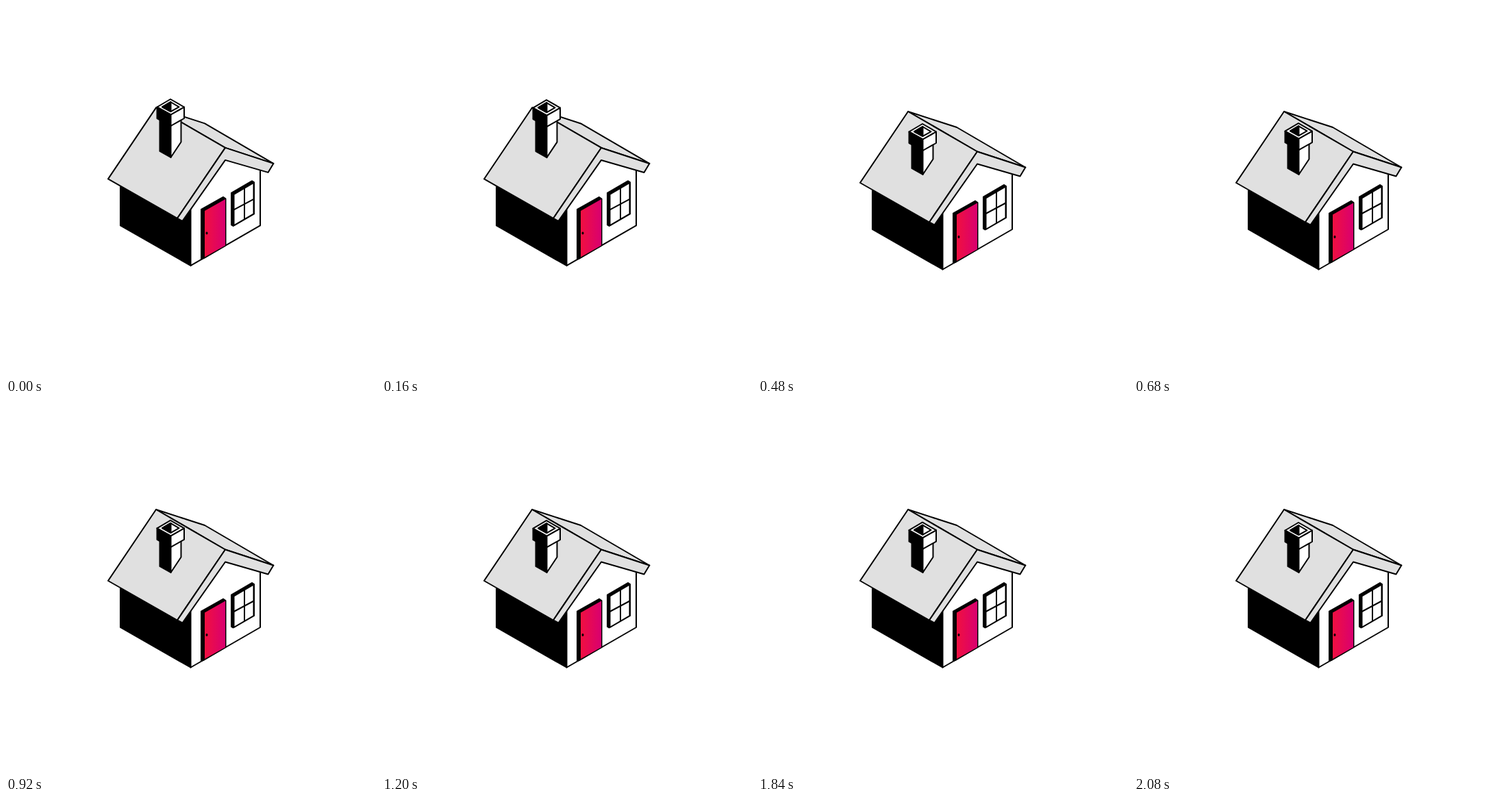
Write an HTML page that moves like this. It is 540x540 px and loops after 8000 ms.

```html
<!DOCTYPE html>
<html>
<head>
<meta charset="utf-8">
<style>
  html, body { margin: 0; width: 100%; height: 100%; overflow: hidden; background: #fff; }
  svg { display: block; width: 100%; height: 100%; }
  polygon, path { stroke: #000; stroke-width: 2; stroke-linejoin: round; fill: #fff; }
  .roof { fill: #e0e0e0; }
  .dark { fill: #000; }
</style>
</head>
<body>
<svg viewBox="0 0 540 540">
  <defs>
    <linearGradient id="pink">
      <stop offset="0" stop-color="#f01040"/>
      <stop offset="1" stop-color="#d90070"/>
    </linearGradient>
  </defs>
  <g id="house">
    <polygon class="dark" points="167,262 167,326 269.5,384.5 269.5,296"/>
    <polygon points="269.5,384.5 371,326 371,242 320,224 269.5,296"/>
    <polygon class="roof" points="219,154 290,177 390.3,235.5 320,212.5"/>
    <polygon class="roof" points="219,154 320,212.5 250,315.5 149,258"/>
    <polygon class="roof" points="320,212.5 390.3,235.5 382.5,248.5 320,230.5 257.5,319.5 250,315.5"/>
    <!-- door -->
    <polygon class="dark" points="285,302.5 317,284.5 320.5,287 320.5,355 289,373.5 285,375"/>
    <polygon points="290,304.5 320,287.5 320,355 290,372" style="fill:url(#pink);stroke:none"/>
    <ellipse cx="293" cy="337" rx="1.5" ry="2"/>
    <!-- window -->
    <polygon class="dark" points="329,278.5 359,261 362,263 362,309 331.5,326.5 329,325"/>
    <polygon points="332.5,280.5 361.5,263.5 361.5,309 332.5,326"/>
    <path d="M348 271.5V317.5M332.5 303L361.5 287.5"/>
  </g>
  <g id="shaft">
    <polygon class="dark" points="224.5,186 240.5,186 240.5,246 224.5,237"/>
    <polygon points="240.5,186 255.5,186 255.5,223.5 240.5,246"/>
  </g>
  <g id="cap">
    <polygon class="dark" points="220.5,184.5 240.5,195.5 240.5,212 220.5,201"/>
    <polygon points="240.5,195.5 260,184.5 260,201 240.5,212"/>
    <polygon points="240,173 260,184.5 240.5,195.5 220.5,184.5"/>
    <polygon points="240,177 252.5,184.3 240.3,191.2 228,184.3"/>
    <polygon class="dark" points="240.5,177 240.5,191 228,184.3"/>
  </g>
</svg>
<script>
  const LOOP = 8000, STEP = 40, LAND = 480, PEAK = 960, REST = 2080;
  const clamp = x => Math.min(1, Math.max(0, x));
  const ease = x => (1 - Math.cos(Math.PI * clamp(x))) / 2;

  // Accelerating drop that ends at LAND
  const drop = (t, from, power) => -from * (1 - clamp(t / LAND) ** power);

  function capY(t) {
    if (t < LAND) return drop(t, 36, 3.2) - 1;
    if (t < PEAK) return -1 - 2.2 * ease((t - LAND) / (PEAK - LAND));
    return -3.2 * (1 - ease((t - PEAK) / (REST - PEAK)));
  }

  const place = (id, y) =>
    document.getElementById(id).setAttribute("transform", `translate(0 ${y.toFixed(2)})`);

  function draw(now) {
    const t = Math.floor((now % LOOP) / STEP) * STEP;
    place("house", drop(t, 5.6, 4.4));
    place("shaft", drop(t, 25, 5.2));
    place("cap", capY(t));
    requestAnimationFrame(draw);
  }
  draw(0);
</script>
</body>
</html>
```
